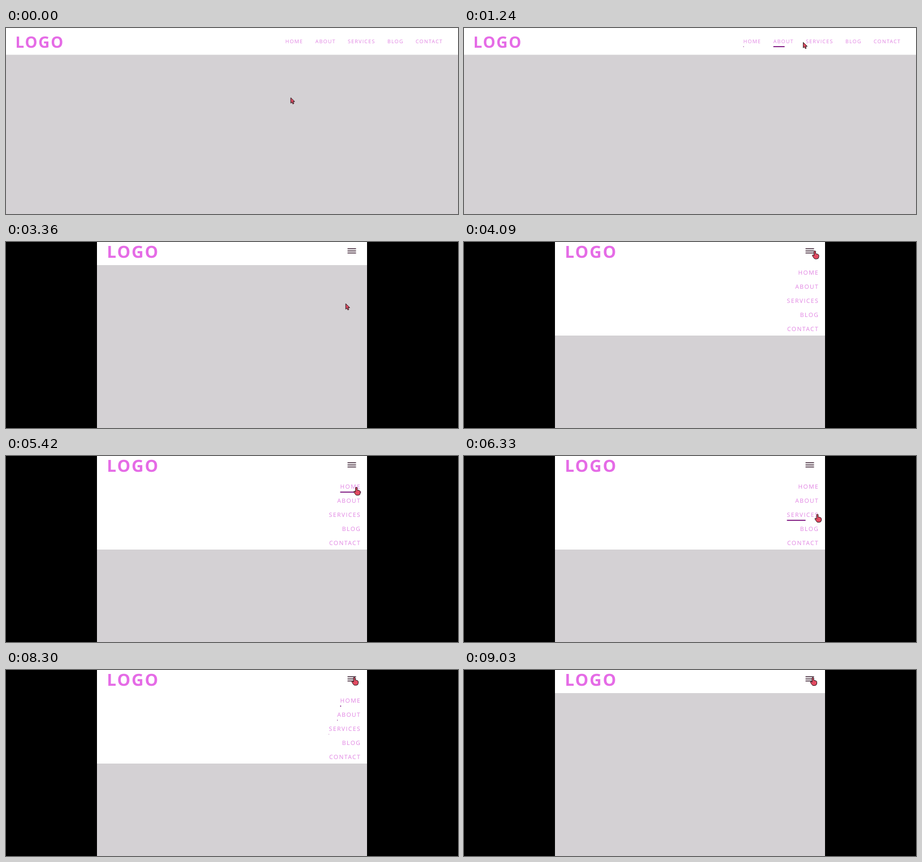
These frames come from a looping animation (800 px wide and 330 px high, 9730 ms). An HTML page:

```html
<!DOCTYPE html>
<html lang="en">
<head>
<meta charset="utf-8">
<title>Responsive navigation</title>
<style>
html, body { margin: 0; width: 100%; height: 100%; overflow: hidden; background: #000; }
svg { display: block; width: 100%; height: 100%; }
text { font-family: "Open Sans", "Noto Sans", sans-serif; text-rendering: geometricPrecision; }
.logo { font-weight: 700; fill: #e56be6; }
.link { fill: #e082e2; }
.bar { fill: #7d147f; }
</style>
</head>
<body>
<svg viewBox="0 0 800 330" preserveAspectRatio="none">
  <g id="wide">
    <rect width="800" height="330" fill="#d4d1d4"/>
    <rect width="800" height="47.5" fill="#fff"/>
    <rect width="800" height="1" fill="#fafafa"/>
    <text class="logo" x="16.4" y="35.3" font-size="27.7" letter-spacing="1.9">LOGO</text>
  </g>
  <g id="narrow">
    <rect width="800" height="330" fill="#000"/>
    <rect x="161" width="478" height="330" fill="#d4d1d4"/>
    <rect id="header" x="161" width="478" height="41" fill="#fff"/>
    <text class="logo" x="178.5" y="27.7" font-size="29.4" letter-spacing="2.2">LOGO</text>
    <path d="M604.5 12H619.5M604.5 15.8H619.5M604.5 19.6H619.5" stroke="#3a1f30" stroke-width="1.5"/>
    <g id="menu"></g>
  </g>
  <g id="cursor" fill="#e34b62" stroke="#26161c" stroke-linejoin="round">
    <path id="arrow" d="M.5 .5V10.2L2.7 8.2 4.2 11.6 6 10.8 4.5 7.5H7.6Z"/>
    <path id="hand" d="M-1.4 1Q0-.6 1.4 1V5.2L5.4 6.2Q7 6.8 7 8.5V11Q6.5 14.5 3.5 14.5H.5Q-1.2 14.3-2 12.5L-4.3 9Q-4.6 7-3 7.3L-1.4 8.7Z"/>
  </g>
</svg>
<script>
const LOOP = 9730, SWITCH = 2550, OPEN = 4090, CLOSE = 8580, FADE = 300;
const $ = id => document.getElementById(id);
const names = ["HOME", "ABOUT", "SERVICES", "BLOG", "CONTACT"];

// Pointer moves: start, end, x, y. It rests in between.
const moves = [
  [0, 0, 503.5, 123.2],
  [550, 840, 510, 25], [840, 1800, 748, 25], [1860, 2240, 645, 107.6],
  [SWITCH, SWITCH, 560, 125], [SWITCH, 3030, 592.5, 101.5], [3300, 3360, 600.8, 109],
  [3640, 4020, 621, 15.5],
  [4850, 5000, 620, 54], [5390, 5640, 622, 79], [5850, 6080, 633, 92], [6120, 6330, 625.5, 103],
  [6670, 7610, 628.5, 156],
  [7880, 8300, 616.5, 12.5], [8910, 9030, 617.5, 13]
];

const clamp = v => Math.max(0, Math.min(1, v));
const smooth = p => p * p * (3 - 2 * p);
const bezier = (a, b, s) => 3 * a * s * (1 - s) ** 2 + 3 * b * s * s * (1 - s) + s ** 3;

// cubic-bezier(.25, .1, .25, 1)
function ease(p) {
  p = clamp(p);
  if (p === 0 || p === 1) return p;
  let lo = 0, hi = 1;
  for (let i = 0; i < 20; i++) {
    const mid = (lo + hi) / 2;
    if (bezier(.25, .25, mid) < p) lo = mid; else hi = mid;
  }
  return bezier(.1, 1, lo);
}

function pointer(t) {
  let x = 0, y = 0;
  for (const [start, end, toX, toY] of moves) {
    if (t < start) break;
    const s = t >= end ? 1 : smooth((t - start) / (end - start));
    x += (toX - x) * s;
    y += (toY - y) * s;
  }
  return [x, y];
}

// Time spans in which the pointer is over a box that exists from "from" to "to".
function hoverSpans({ left, right, top, bottom, from, to }) {
  const spans = [];
  let over = false;
  for (let t = from; t <= to; t += 5) {
    const [x, y] = pointer(t);
    const now = t < to && x >= left && x <= right && y >= top && y <= bottom;
    if (now && !over) spans.push([t, to]);
    if (!now && over) spans[spans.length - 1][1] = t;
    over = now;
  }
  return spans;
}

function make(parent, tag, attrs) {
  const el = document.createElementNS("http://www.w3.org/2000/svg", tag);
  for (const key in attrs) el.setAttribute(key, attrs[key]);
  return parent.appendChild(el);
}

function makeLink(parent, name, right, y, { size, spacing, drop, from, to }) {
  const text = make(parent, "text", { class: "link", y, "font-size": size, "letter-spacing": spacing });
  text.textContent = name;
  const width = text.getComputedTextLength(), left = right - width, middle = y - size * .36;
  text.setAttribute("x", left);
  const bar = make(parent, "rect", { class: "bar", x: left, y: y + drop, width: 0, height: 1.8 });
  const spans = hoverSpans({ left, right: right + 1, top: middle - 10, bottom: middle + 10, from, to });
  return { bar, left, width, spans };
}

const row = { size: 9, spacing: 1.2, drop: 4.8, from: 0, to: SWITCH };
const column = { size: 10.4, spacing: 1.45, drop: 5.5, from: OPEN, to: CLOSE };
const links = names.map((name, i) => makeLink($("menu"), name, 628.2, 57.7 + 25 * i, column));
let edge = 773.3;
for (const name of [...names].reverse()) {
  const link = makeLink($("wide"), name, edge, 27.4, row);
  edge = link.left - 21.4;
  links.push(link);
}
const burger = hoverSpans({ left: 598, right: 627, top: 5, bottom: 27, from: SWITCH, to: LOOP });
const handSpans = links.flatMap(link => link.spans).concat(burger);

function grown(t, [enter, leave]) {
  return ease((Math.min(t, leave) - enter) / FADE) * (1 - ease((t - leave) / FADE));
}

const show = (el, on) => el.setAttribute("display", on ? "inline" : "none");

function render(t) {
  const wide = t < SWITCH, open = t >= OPEN && t < CLOSE;
  show($("wide"), wide);
  show($("narrow"), !wide);
  show($("menu"), open);
  $("header").setAttribute("height", open ? 166 : 41);

  for (const { bar, width, spans } of links)
    bar.setAttribute("width", width * Math.max(0, ...spans.map(span => grown(t, span))));

  const [x, y] = pointer(t);
  const hand = handSpans.some(([a, b]) => t >= a && t < b);
  $("cursor").setAttribute("transform", `translate(${x} ${y})`);
  show($("hand"), hand);
  show($("arrow"), !hand);
}

function tick() {
  render(performance.now() % LOOP);
  requestAnimationFrame(tick);
}
tick();
</script>
</body>
</html>
```
